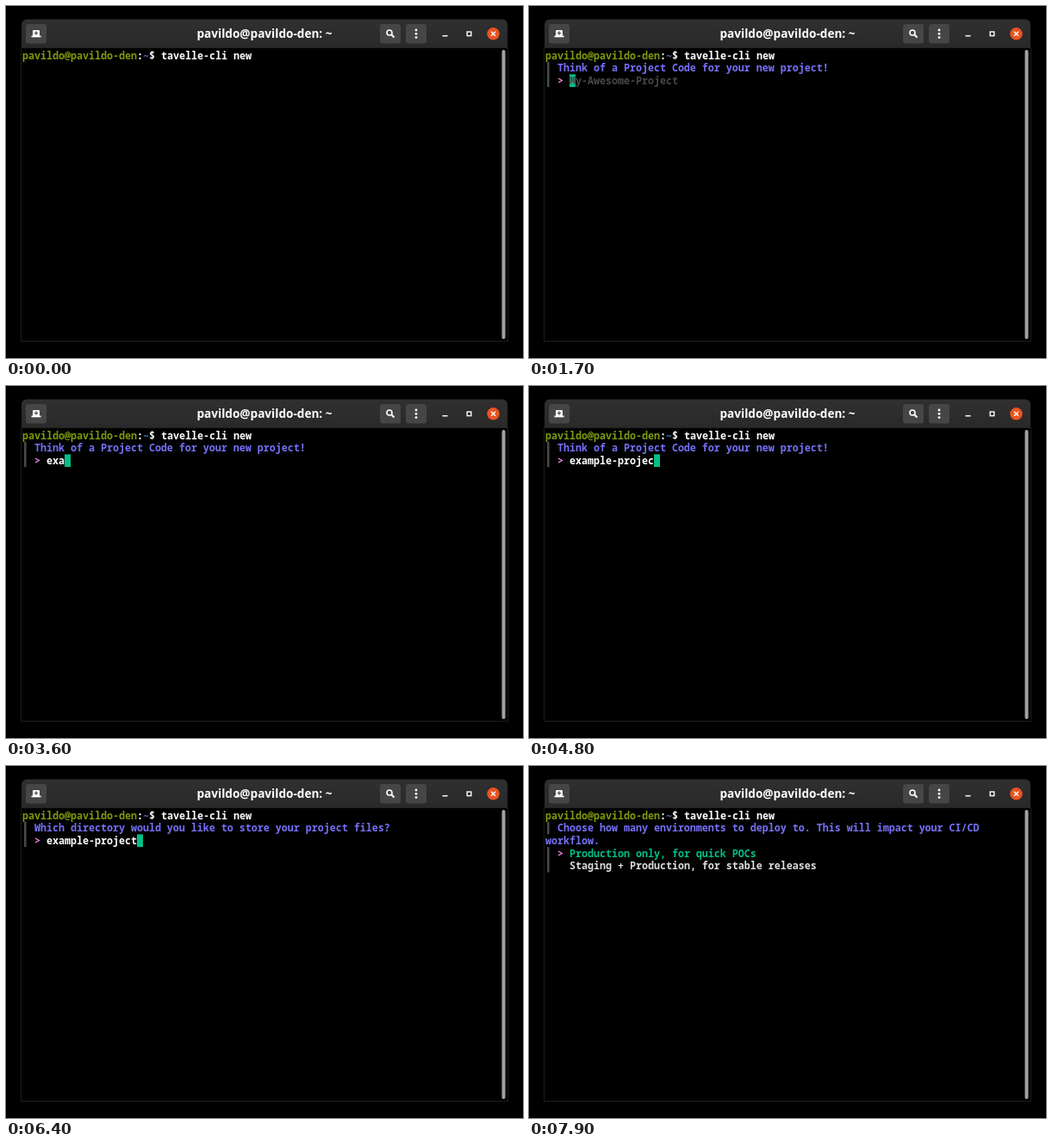
These frames come from a looping animation (600x409 px, 8 s). An HTML page with a canvas:

```html
<!DOCTYPE html>
<html lang="en">
<head>
<meta charset="utf-8">
<title>Terminal</title>
<style>
  html, body { margin: 0; width: 100%; height: 100%; overflow: hidden; background: #000; }
  canvas { display: block; }
</style>
</head>
<body>
<canvas id="stage" width="600" height="409"></canvas>
<script>
const ctx = document.getElementById('stage').getContext('2d');
const LOOP = 8000;
const USER = 'pavildo@pavildo-den';
const NAME = 'example-project';
const CELL = 7, ROW = 14.7, LEFT = 19, TOP = 50;
const WHITE = '#fff', INDIGO = '#7571f9', PINK = '#f780e2', GREEN = '#02bf87',
      GREY = '#484848', SOFT = '#dddddd', OLIVE = '#7e9b0c', BLUE = '#5a88cc';

function box(x, y, w, h, color, radius = 0) {
  ctx.fillStyle = color;
  ctx.beginPath();
  ctx.roundRect(x, y, w, h, radius);
  ctx.fill();
}

function line(color, width, ...points) {
  ctx.strokeStyle = color;
  ctx.lineWidth = width;
  ctx.beginPath();
  for (let i = 0; i < points.length; i += 4) {
    ctx.moveTo(points[i], points[i + 1]);
    ctx.lineTo(points[i + 2], points[i + 3]);
  }
  ctx.stroke();
}

function disc(x, y, r, color) {
  ctx.fillStyle = color;
  ctx.beginPath();
  ctx.arc(x, y, r, 0, 7);
  ctx.fill();
}

// Terminal cells are addressed by column and row.
function put(col, row, text, color) {
  ctx.font = `bold ${CELL / 0.6}px "Noto Sans Mono", "DejaVu Sans Mono", monospace`;
  ctx.textAlign = 'left';
  ctx.fillStyle = color;
  ctx.fillText(text, LEFT + col * CELL, TOP + 11.6 + row * ROW);
}

function block(col, row, color, count = 1) {
  box(LEFT + col * CELL, TOP + row * ROW, count * CELL, ROW, color);
}

function border(row, count) {
  box(21, TOP + row * ROW, 2.6, count * ROW, GREY);
}

function drawWindow() {
  box(0, 0, 600, 409, '#000');
  ctx.strokeStyle = '#1c1c1c';
  ctx.lineWidth = 1;
  ctx.strokeRect(17.5, 48.5, 565, 341);

  const bar = ctx.createLinearGradient(0, 15, 0, 49);
  bar.addColorStop(0, '#303030');
  bar.addColorStop(1, '#292929');
  box(18, 15.5, 564, 33, bar, [6, 6, 0, 0]);

  ctx.font = 'bold 13.6px "Open Sans", "Noto Sans", sans-serif';
  ctx.textAlign = 'center';
  ctx.fillStyle = WHITE;
  ctx.fillText(USER + ': ~', 300, 37);

  for (const x of [23, 434, 464]) box(x, 21, 24, 22.5, '#464646', 3);

  // New tab
  box(31, 28, 8, 7, WHITE, 1);
  box(29.5, 34.5, 11, 1.8, WHITE);
  line('#464646', 1.2, 35, 29.3, 35, 33.7, 32.8, 31.5, 37.2, 31.5);

  // Search
  ctx.strokeStyle = WHITE;
  ctx.lineWidth = 1.6;
  ctx.beginPath();
  ctx.arc(445, 31, 3, 0, 7);
  ctx.stroke();
  line(WHITE, 2, 447.2, 33.2, 450.5, 36.5);

  // Menu
  for (const y of [28, 32.3, 36.6]) disc(476, y, 1.4, WHITE);

  // Window controls
  line(WHITE, 1.5, 506.5, 34.7, 512.5, 34.7);
  ctx.lineWidth = 1.4;
  ctx.strokeRect(535.2, 30, 4.6, 4.6);
  disc(565.5, 32.3, 7.2, '#e95420');
  line(WHITE, 1.4, 563, 29.8, 568, 34.8, 568, 29.8, 563, 34.8);

  box(575.5, 51, 4, 336, '#a2a2a2', 2);
}

function drawPrompt() {
  put(0, 0, USER, OLIVE);
  put(19, 0, ':', WHITE);
  put(20, 0, '~', BLUE);
  put(21, 0, '$ tavelle-cli new', WHITE);
}

function drawIntro() {
  border(1, 6);
  put(2, 1, 'Welcome!', INDIGO);
  put(2, 2, 'This tool will ask a few short questions and then set up a new project with', SOFT);
  put(2, 3, 'a code, a directory and the environments that you choose.', SOFT);
  block(2, 6, PINK, 8);
  put(4, 6, 'Next', WHITE);
}

function drawInput(question, value, cursorOn) {
  border(1, 2);
  put(2, 1, question, INDIGO);
  put(2, 2, '>', PINK);
  if (cursorOn) block(4 + value.length, 2, GREEN);
  if (value) put(4, 2, value, WHITE);
  else put(4, 2, 'My-Awesome-Project', GREY);
}

function drawChoice(row, first, second) {
  border(row, 2);
  put(2, row, '>', PINK);
  put(4, row, first, GREEN);
  put(4, row + 1, second, SOFT);
}

function typedCount(t) {
  if (t < 3600) return [2900, 3200, 3400].filter(start => t >= start).length;
  return Math.min(NAME.length, 3 + Math.floor((t - 3590) / 110));
}

function drawScreen(t) {
  drawPrompt();
  if (t < 600) {
    if (t >= 300) block(38, 0, WHITE);
  } else if (t < 700) {
    block(0, 1, WHITE);
  } else if (t < 1700) {
    drawIntro();
  } else if (t < 5200) {
    const cursorOn = t < 2100 || t >= 2600;
    drawInput('Think of a Project Code for your new project!', NAME.slice(0, typedCount(t)), cursorOn);
  } else if (t < 6800) {
    const cursorOn = t < 5700 || t >= 6200;
    drawInput('Which directory would you like to store your project files?', NAME, cursorOn);
  } else if (t < 7700) {
    border(1, 1);
    put(2, 1, 'What type of project would you like to create?', INDIGO);
    drawChoice(2, 'Simple Backend API', 'Simple Frontend Page');
  } else {
    border(1, 1);
    put(2, 1, 'Choose how many environments to deploy to. This will impact your CI/CD', INDIGO);
    put(0, 2, 'workflow.', INDIGO);
    drawChoice(3, 'Production only, for quick POCs', 'Staging + Production, for stable releases');
  }
}

function frame() {
  drawWindow();
  drawScreen(performance.now() % LOOP);
  requestAnimationFrame(frame);
}
frame();
</script>
</body>
</html>
```
